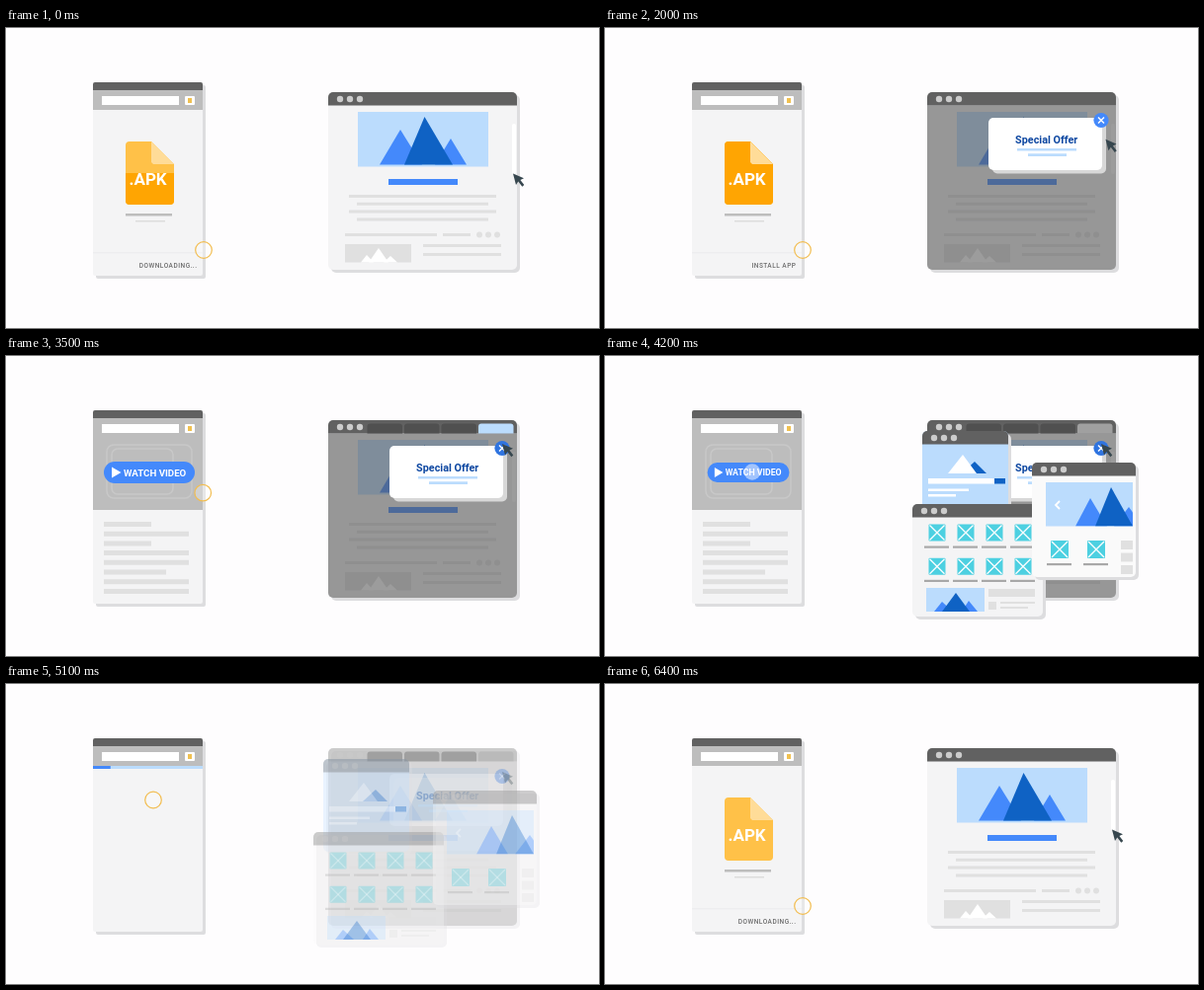
An HTML page with a canvas that plays this animation: 600 px wide and 304 px high, repeating every 6.7 s.

```html
<!DOCTYPE html>
<html lang="en">
<head>
<meta charset="utf-8">
<title>Disruptive ads</title>
<style>
html, body { margin: 0; width: 100%; height: 100%; overflow: hidden; background: #fefdfe; }
canvas { display: block; width: 600px; height: 304px; }
</style>
</head>
<body>
<canvas id="stage"></canvas>
<script>
const W = 600, H = 304, LOOP = 6700, STEP = 100, LAST = 6400;
const DARK = '#616161', GRAY = '#bdbdbd', PALE = '#e0e0e0', PAPER = '#f4f4f5';
const SKY = '#bbdcfd', BLUE = '#4489fb', NAVY = '#0f62c4', TEAL = '#4dd0e1';
const SHADOW = '#dddddf', AMBER = '#ffa502', LIGHT_AMBER = '#ffc148';

const canvas = document.getElementById('stage');
const ctx = canvas.getContext('2d');
const dpr = window.devicePixelRatio || 1;
canvas.width = W * dpr;
canvas.height = H * dpr;

const ramp = (t, a, b) => Math.min(1, Math.max(0, (t - a) / (b - a)));
const ease = x => x * x * (3 - 2 * x);
const easeOut = x => 1 - (1 - x) ** 3;
const mix = (a, b, k) => a + (b - a) * k;

// Basic shapes, given by their edges
function box(x1, y1, x2, y2, color, r = 0) {
  ctx.fillStyle = color;
  ctx.beginPath();
  ctx.roundRect(x1, y1, x2 - x1, y2 - y1, r);
  ctx.fill();
}

function poly(color, ...pts) {
  ctx.fillStyle = color;
  ctx.beginPath();
  for (let i = 0; i < pts.length; i += 2) ctx.lineTo(pts[i], pts[i + 1]);
  ctx.closePath();
  ctx.fill();
}

function stroke(color, width, ...pts) {
  ctx.strokeStyle = color;
  ctx.lineWidth = width;
  ctx.beginPath();
  for (let i = 0; i < pts.length; i += 2) ctx.lineTo(pts[i], pts[i + 1]);
  ctx.stroke();
}

function disc(x, y, r, color) {
  ctx.fillStyle = color;
  ctx.beginPath();
  ctx.arc(x, y, r, 0, 7);
  ctx.fill();
}

function label(str, x, y, font, color, align = 'left', spacing = 0) {
  ctx.font = font + ' Roboto, sans-serif';
  ctx.letterSpacing = spacing + 'px';
  ctx.textAlign = align;
  ctx.fillStyle = color;
  ctx.fillText(str, x, y);
}

function layer(alpha, draw) {
  if (alpha <= 0) return;
  ctx.save();
  ctx.globalAlpha *= alpha;
  draw();
  ctx.restore();
}

function scaled(cx, cy, k, draw) {
  ctx.save();
  ctx.translate(cx, cy);
  ctx.scale(k, k);
  ctx.translate(-cx, -cy);
  draw();
  ctx.restore();
}

function popIn(t, start, cx, cy, draw) {
  const k = ramp(t, start, start + 250);
  layer(k, () => scaled(cx, cy, mix(0.7, 1, easeOut(k)), draw));
}

function peak(x1, top, tip, x2, base, color) {
  poly(color, x1, base, tip, top, x2, base);
}

function clipped(x1, y1, x2, y2, draw) {
  ctx.save();
  ctx.beginPath();
  ctx.rect(x1, y1, x2 - x1, y2 - y1);
  ctx.clip();
  draw();
  ctx.restore();
}

// Phone
function phoneFrame() {
  box(91, 58, 202, 254, SHADOW, 2);
  box(88, 55, 199, 251, PAPER, 2);
  box(88, 55, 199, 64, DARK, [2, 2, 0, 0]);
  box(88, 63, 199, 83, GRAY);
  box(97, 69, 175, 78, '#fff');
  box(181, 69, 191, 78, '#fff', 1);
  box(184, 71, 188, 76, '#f0c050');
}

function docShape() {
  ctx.beginPath();
  ctx.moveTo(125, 115);
  ctx.lineTo(147, 115);
  ctx.lineTo(170, 138);
  ctx.arcTo(170, 179, 166, 179, 4);
  ctx.arcTo(121, 179, 121, 175, 4);
  ctx.arcTo(121, 115, 125, 115, 4);
  ctx.closePath();
}

function downloadPage(t, level, status) {
  ctx.save();
  docShape();
  ctx.clip();
  box(120, 114, 171, 180, LIGHT_AMBER);
  box(120, 179 - 64 * level, 171, 180, AMBER);
  ctx.restore();
  poly('#ffdc98', 147, 115, 170, 138, 149, 138, 147, 136);
  label('.APK', 124.5, 158.5, 'bold 17px', '#fff');
  box(121, 188, 168, 190.6, GRAY);
  box(131, 195, 161, 196.5, '#dcdcdc');
  box(88, 227.5, 199, 228.3, '#e8e8ea');
  label(status, 193.5, 242.5, '500 6.5px', '#6b6b6b', 'right', 0.5);
}

function videoPage(t) {
  box(88, 83, 199, 156, GRAY);
  ctx.strokeStyle = '#c8c8c8';
  ctx.lineWidth = 1.5;
  ctx.beginPath();
  ctx.roundRect(102, 90, 86, 54, 7);
  ctx.roundRect(107, 94, 62, 46, 6);
  ctx.stroke();
  const ends = [147, 185, 147, 185, 185, 162, 185, 185];
  ends.forEach((x, i) => {
    const y = 170.5 + i * 9.7;
    box(99, y - 2.5, x, y + 2.5, PALE);
  });
  const press = ramp(t, 3900, 4200) - ramp(t, 4300, 4500);
  popIn(t, 2500, 145, 118, () => scaled(145.5, 118, 1 - 0.1 * press, () => {
    box(99, 107, 191, 129, BLUE, 11);
    poly('#fff', 107, 112.5, 116.5, 118, 107, 123.5);
    label('WATCH VIDEO', 119, 121.5, 'bold 9.7px', '#fff');
  }));
}

function loadingPage(t) {
  layer(ramp(t, 4800, 5000) - ramp(t, 5600, 5700), () => {
    box(88, 83, 199, 86, SKY);
    box(88, 83, 88 + 111 * Math.min(1, 0.16 + ramp(t, 5100, 5600)), 86, BLUE);
  });
}

function touchRing(t) {
  const out = ease(ramp(t, 3000, 4000)), back = ease(ramp(t, 5400, 6100));
  const u = 1 - out;
  let x = u * u * 200 + 2 * u * out * 224 + out * out * 149;
  let y = u * u * 225 + 2 * u * out * 106 + out * out * 117.5;
  x = mix(x, 200, back);
  y = mix(y, 225, back);
  const press = ramp(t, 4000, 4200) - ramp(t, 4300, 4600);
  disc(x, y, 8.3, `rgba(255,255,255,${mix(0.3, 0.5, press)})`);
  layer(1 - press, () => {
    ctx.strokeStyle = '#f2bd50';
    ctx.lineWidth = 1.2;
    ctx.beginPath();
    ctx.arc(x, y, 8.3, 0, 7);
    ctx.stroke();
  });
}

function phone(t) {
  phoneFrame();
  const again = ramp(t, 5600, 5900);
  const first = 1 - ramp(t, 2050, 2400);
  if (t < 2400) {
    const level = Math.min(1, 0.5 + t / 800);
    layer(first, () => downloadPage(t, level, t < 1000 ? 'DOWNLOADING...' : 'INSTALL APP'));
  }
  layer(ramp(t, 2050, 2400) - ramp(t, 4400, 4700), () => videoPage(t));
  loadingPage(t);
  layer(again, () => downloadPage(t, 0, 'DOWNLOADING...'));
  touchRing(t);
}

// Browser windows
function windowFrame(x1, y1, x2, y2, body = PAPER) {
  box(x1 + 3, y1 + 3, x2 + 3, y2 + 3, SHADOW, 5);
  box(x1, y1, x2, y2, body, 5);
  box(x1, y1, x2, y1 + 13.5, DARK, [5, 5, 0, 0]);
  for (let i = 0; i < 3; i++) disc(x1 + 12 + i * 10, y1 + 7, 3.2, '#cccccc');
}

function pageContent() {
  box(356, 85, 488, 140.5, SKY);
  peak(378, 103, 399, 421, 138.5, BLUE);
  peak(434, 112, 450, 466, 138.5, BLUE);
  peak(403, 90, 423.5, 452, 138.5, NAVY);
  box(387, 153, 457, 159, BLUE);
  for (let i = 0; i < 4; i++) {
    const inset = i % 2 * 8, y = 169 + i * 7.8;
    box(347 + inset, y, 496 - inset, y + 3, PALE);
  }
  box(343, 208, 436, 211, PALE);
  box(442, 208, 470, 211, PALE);
  for (let i = 0; i < 3; i++) disc(479 + i * 9, 209.5, 3, PALE);
  box(343, 219, 410, 237.5, PALE);
  peak(359, 230, 365, 372, 237.5, '#fff');
  peak(367, 223, 377, 387, 237.5, '#fff');
  peak(382, 231, 389, 396, 237.5, '#fff');
  box(422, 219, 501, 222, PALE);
  box(422, 228, 501, 231, PALE);
  box(512, 97, 516, 148, '#fff', 2);
}

function tabs(t) {
  for (let i = 0; i < 4; i++) {
    const start = 2550 + i * 250;
    const rise = easeOut(ramp(t, start, start + 150));
    if (!rise) continue;
    const x = 365.5 + i * 37.5;
    const last = i === 3;
    const open = last ? t < 3650 : t < start + 250;
    const color = open ? SKY : last ? '#a0a0a0' : '#505050';
    box(x, 78.5 - 10 * rise, x + 35.5, 78.5, color, [3, 3, 0, 0]);
  }
}

function offer(t) {
  popIn(t, 850, 447, 118, () => {
    box(392, 95, 507, 147.5, '#d8d8d8', 5);
    box(388, 91, 503, 144, '#fff', 5);
    label('Special Offer', 446.7, 116.5, 'bold 10.8px', '#0d47a1', 'center');
    box(417, 122, 477, 124.6, SKY);
    box(428, 127.3, 467, 130, SKY);
    const press = ramp(t, 2300, 2400) - ramp(t, 2500, 2600);
    scaled(502, 93.5, 1 - 0.12 * press, () => {
      disc(502, 93.5, 7.6, t < 2400 ? BLUE : '#2f74e0');
      stroke('#fff', 1.5, 499, 90.5, 505, 96.5);
      stroke('#fff', 1.5, 505, 90.5, 499, 96.5);
    });
  });
}

function arrow(t) {
  const k = t > 5250 ? 0 : ease(ramp(t, 1550, 2350));
  const x = mix(513, 502, k), y = mix(147.5, 89, k);
  ctx.save();
  ctx.translate(x, y);
  poly('#37474f', 0, 0, 3, 11.5, 5.3, 8, 9.3, 13.2, 11.3, 11.4, 7.4, 6.6, 11, 4.8);
  ctx.restore();
}

function crossIcon(x, y, h = 8.5) {
  box(x - h, y - h, x + h, y + h, TEAL, 1);
  stroke('#fff', 1.3, x - h + 1, y - h + 1, x + h - 1, y + h - 1);
  stroke('#fff', 1.3, x + h - 1, y - h + 1, x - h + 1, y + h - 1);
  box(x - 13, y + h + 5, x + 12, y + h + 7.2, '#a8a8a8');
}

function signupWindow() {
  windowFrame(321, 76, 408, 170, SKY);
  peak(361, 107, 374, 386, 119, NAVY);
  peak(347, 100, 362, 376, 119, '#fff');
  box(327, 124, 394, 129.5, '#fff');
  box(394, 124, 405, 129.5, NAVY);
  box(327, 134.5, 368, 137, '#fff');
  box(327, 140, 355, 142.5, '#fff');
}

function gridWindow() {
  windowFrame(311, 150, 443, 264);
  for (let i = 0; i < 8; i++) crossIcon(336 + i % 4 * 29, 179 + (i >> 2) * 34.3);
  box(325, 235, 384, 259, SKY);
  peak(333, 249, 341, 352, 259, BLUE);
  peak(361, 248, 368, 377, 259, BLUE);
  peak(341, 240, 355, 369, 259, NAVY);
  box(388, 236, 435, 244, PALE);
  box(388, 249, 396, 257, PALE);
  box(400, 249, 435, 251, PALE);
  box(400, 254, 428, 256, PALE);
}

function galleryWindow() {
  windowFrame(432, 108, 537, 224, '#fafafa');
  box(446, 128, 534, 172.5, SKY);
  clipped(446, 128, 534, 172.5, () => {
    peak(476, 144, 491, 508, 172.5, BLUE);
    peak(515, 153, 530, 544, 172.5, BLUE);
    peak(496, 133, 512, 534, 172.5, NAVY);
  });
  stroke('#fff', 1.8, 460, 147, 456, 151, 460, 155);
  crossIcon(460, 196, 9);
  crossIcon(497, 196, 9);
  for (let i = 0; i < 3; i++) box(522, 187 + i * 12.5, 534, 196 + i * 12.5, PALE);
}

function browser(t) {
  layer(1 - ramp(t, 4950, 5170), () => {
    windowFrame(326, 65, 517, 245);
    pageContent();
    layer(0.58 * ramp(t, 50, 600), () => box(326, 78.5, 517, 245, '#555555', [0, 0, 5, 5]));
    tabs(t);
    offer(t);
    popIn(t, 3550, 365, 120, signupWindow);
    popIn(t, 3700, 377, 207, gridWindow);
    popIn(t, 3850, 485, 166, galleryWindow);
    arrow(t);
  });
  layer(ramp(t, 5200, 5600), () => {
    windowFrame(326, 65, 517, 245);
    pageContent();
    arrow(t);
  });
}

function frame(now) {
  const t = Math.min(LAST, Math.floor(now % LOOP / STEP) * STEP);
  ctx.setTransform(dpr, 0, 0, dpr, 0, 0);
  box(0, 0, W, H, '#fefdfe');
  phone(t);
  browser(t);
  requestAnimationFrame(() => frame(performance.now() - origin));
}

const origin = performance.now();
frame(0);
</script>
</body>
</html>
```
